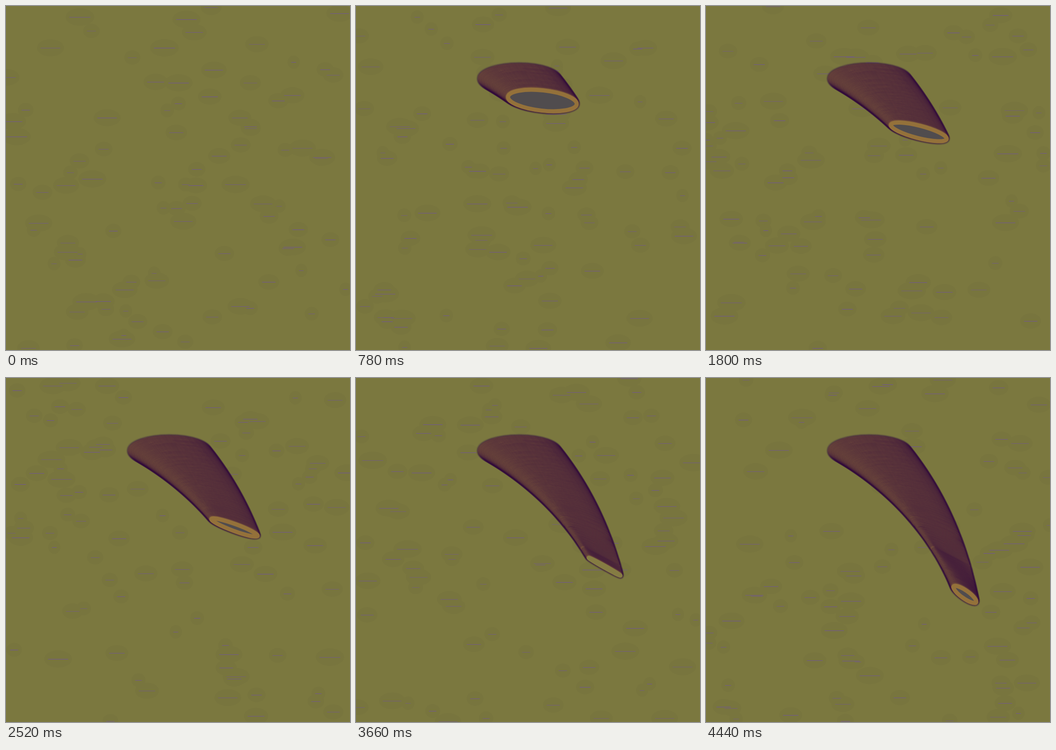
Write an HTML page with a canvas that moves like this. It is 748 by 748 pixels and loops after 4.5 s.

```html
<!DOCTYPE html>
<html>
<head>
<meta charset="utf-8">
<style>
html, body { margin: 0; height: 100%; overflow: hidden; background: #7b783f; }
canvas { display: block; }
</style>
</head>
<body>
<canvas id="stage" width="748" height="748"></canvas>
<script>
const SIZE = 748, LOOP = 4500, STEP = 60, RING = 9, SUBSTEP = 0.25;
const ctx = document.getElementById('stage').getContext('2d');

function seeded(seed) {
  let s = seed * 7919 + 12345;
  return () => {
    s = (s + 0x6D2B79F5) | 0;
    let r = Math.imul(s ^ (s >>> 15), 1 | s);
    r ^= r + Math.imul(r ^ (r >>> 7), 61 | r);
    return ((r ^ (r >>> 14)) >>> 0) / 4294967296;
  };
}

function drawBackground(step) {
  const random = seeded(step + 1);
  ctx.fillStyle = '#7b783f';
  ctx.fillRect(0, 0, SIZE, SIZE);

  const dashes = Array.from({ length: 92 }, () => ({
    x: random() * SIZE,
    y: Math.floor(random() * SIZE),
    length: 10 + random() * 36,
    alpha: 0.55 + random() * 0.45
  }));

  ctx.fillStyle = '#78753e';
  for (const d of dashes) {
    ctx.beginPath();
    ctx.ellipse(d.x, d.y, d.length / 2 + 8, 13 + d.length * 0.13, 0, 0, 7);
    ctx.fill();
  }
  ctx.fillStyle = '#70549a';
  for (const d of dashes) {
    ctx.globalAlpha = d.alpha;
    ctx.fillRect(d.x - d.length / 2, d.y, d.length, 1);
  }
  ctx.globalAlpha = 1;
}

// The ring flattens, turns over, then opens again as it travels.
function drawRing(n, isFront) {
  const x = 354.4 + 4.15 * n - 0.018 * n * n;
  const y = 157.8 + 3.5 * n + 0.01375 * n * n - 0.000053 * n ** 3;
  const ry = 28.5 - 0.5 * n;
  const turning = ry < 0 && ry > -3.5;

  ctx.beginPath();
  ctx.ellipse(x, y, 84.7 - 0.74 * n, Math.abs(ry), 0.48 * n * Math.PI / 180, 0, Math.PI * 2);

  // Soft shade around the ring; it builds up along the trail.
  ctx.strokeStyle = 'rgba(56, 22, 62, 0.08)';
  for (let k = 5; k > 0; k--) {
    ctx.lineWidth = RING + 1.6 * k;
    ctx.stroke();
  }
  ctx.fillStyle = '#504c4e';
  ctx.fill();
  ctx.lineWidth = RING;
  ctx.strokeStyle = isFront && turning ? '#857c43' : '#94713a';
  ctx.stroke();
}

let shown = -1;
function frame() {
  const step = Math.floor(performance.now() % LOOP / STEP);
  if (step !== shown) {
    shown = step;
    drawBackground(step);
    if (step > 0) for (let n = 0; n <= step; n += SUBSTEP) drawRing(n, n === step);
  }
  requestAnimationFrame(frame);
}
frame();
</script>
</body>
</html>
```
